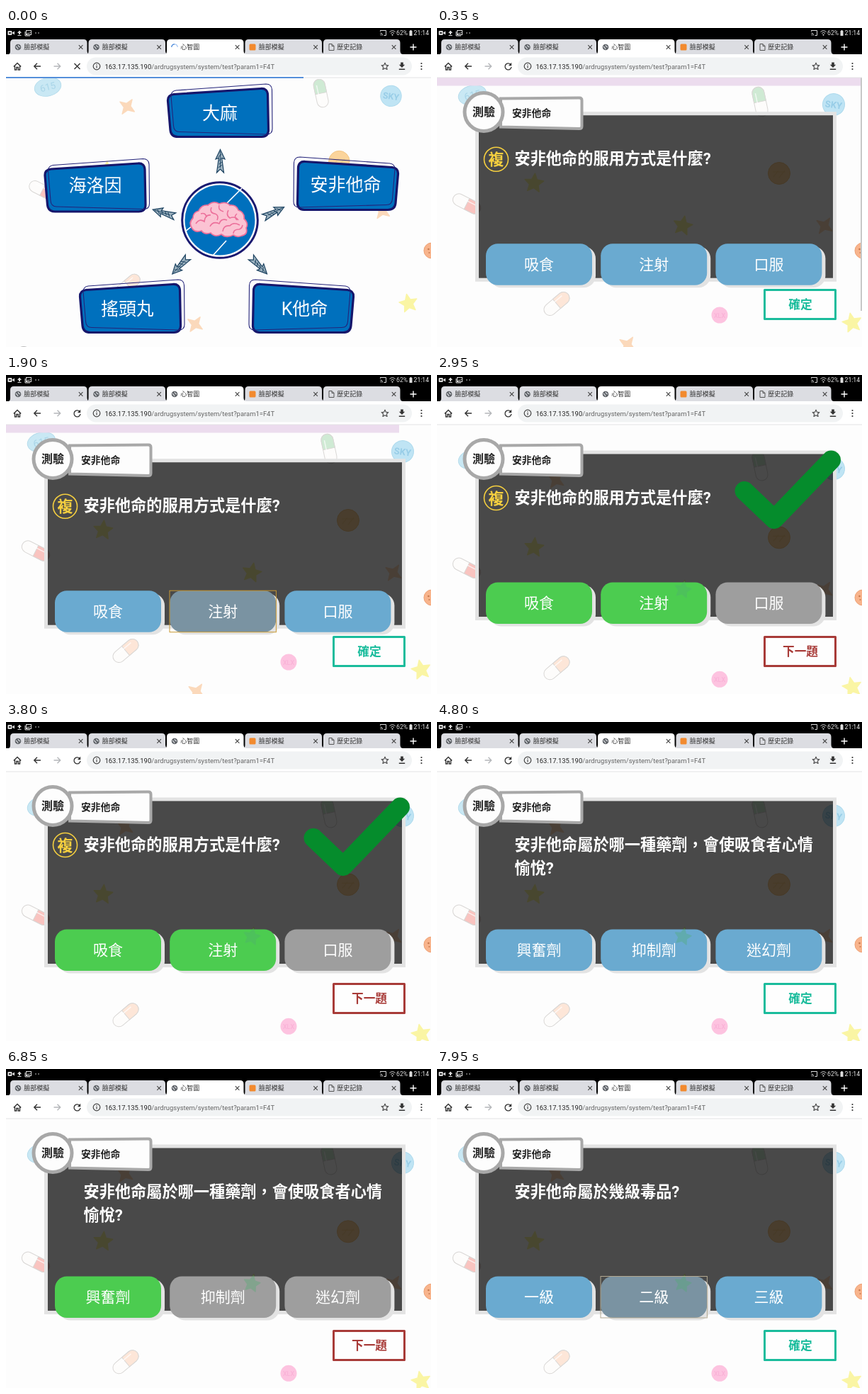
Recreate the animation shown at these times as an HTML page. Size 600x450 px, loop 8 s.

```html
<!DOCTYPE html>
<html lang="zh-Hant">
<head>
<meta charset="utf-8">
<title>心智圖</title>
<style>
html, body { margin: 0; width: 100%; height: 100%; overflow: hidden; background: #fdfdfd; }
svg { display: block; width: 100vw; height: 100vh; font-family: Roboto, "Noto Sans CJK TC", sans-serif; }
.mid { text-anchor: middle; }
.bold { font-weight: 700; }
.line { fill: none; stroke: #333; stroke-width: 1.4; }
</style>
</head>
<body>
<svg id="stage" viewBox="0 0 600 450"></svg>
<script>
const LOOP = 8000;

const questions = [
  { lines: ['安非他命的服用方式是什麼?'], options: ['吸食', '注射', '口服'], multiple: true },
  { lines: ['安非他命屬於哪一種藥劑，會使吸食者心情', '愉悅?'], options: ['興奮劑', '抑制劑', '迷幻劑'] },
  { lines: ['安非他命屬於幾級毒品?'], options: ['一級', '二級', '三級'] }
];

const steps = [
  { at: 0, map: true },
  { at: 250, q: 0, timed: true },
  { at: 1800, q: 0, timed: true, picked: [1], focus: 1, ring: '#c99a35' },
  { at: 2250, q: 0, timed: true, picked: [0, 1], focus: 0, ring: '#c99a35' },
  { at: 2700, q: 0, right: [0, 1], tick: true },
  { at: 3900, q: 1 },
  { at: 5850, q: 1, picked: [1], focus: 1, ring: '#b3a991' },
  { at: 6550, q: 1, right: [0] },
  { at: 7100, q: 2 },
  { at: 7700, q: 2, picked: [1], focus: 1, ring: '#b3a991' }
];

const rect = (x, y, w, h, fill, extra = '') =>
  `<rect x="${x}" y="${y}" width="${w}" height="${h}" fill="${fill}" ${extra}/>`;
const circle = (x, y, r, fill, extra = '') => `<circle cx="${x}" cy="${y}" r="${r}" fill="${fill}" ${extra}/>`;
const path = (d, extra = 'class="line"') => `<path d="${d}" ${extra}/>`;
const text = (x, y, size, fill, str, cls = '') =>
  `<text x="${x}" y="${y}" font-size="${size}" fill="${fill}" class="${cls}">${str}</text>`;
const group = (transform, body) => `<g transform="${transform}">${body}</g>`;

function star(x, y, points, outer, inner, fill, turn = 0, extra = '') {
  const pts = Array.from({ length: points * 2 }, (_, i) => {
    const r = i % 2 ? inner : outer, a = i * Math.PI / points - Math.PI / 2 + turn;
    return `${(x + r * Math.cos(a)).toFixed(1)},${(y + r * Math.sin(a)).toFixed(1)}`;
  });
  return `<polygon points="${pts.join(' ')}" fill="${fill}" stroke="${fill}" stroke-width="1.5" stroke-linejoin="round" ${extra}/>`;
}

const capsule = (x, y, turn, color) => group(`translate(${x} ${y}) rotate(${turn})`,
  rect(-8.5, -21, 17, 42, '#fdfcfb', 'rx="8.5" stroke="#d9d7d5"') +
  path('M-8.5,0V-12.5a8.5,8.5 0 0 1 17,0V0z', `fill="${color}" stroke="#d9d7d5"`) +
  path('M-4,-13V14', 'stroke="#fff" stroke-width="1.5" opacity=".7"'));

function backdrop() {
  const peach = '#fbd9bb', yellow = '#faf5a4';
  return group('translate(50 94.5) rotate(-14)',
      '<ellipse rx="20" ry="13.5" fill="#c9e8f4" stroke="#b5dcec"/>' +
      text(0, 5, 14, '#a9d5e8', '615', 'mid')) +
    group('translate(560 108) rotate(8)', circle(0, 0, 15.5, '#bfe4f4', 'stroke="#aedaed"') +
      text(0, 5, 13, '#98cde7', 'SKY', 'mid bold')) +
    capsule(456, 104, -12, '#cfead4') + capsule(42, 248, 117, '#f9c4c0') + capsule(169, 389, 50, '#fde6d8') +
    circle(483, 205, 15.5, '#fbd49b', 'stroke="#f3c583"') +
    path('M475,210l7,-9M483,211l8,-10M474,203h18', 'fill="none" stroke="#f5c888" stroke-width="1.2"') +
    circle(399, 405, 11.5, '#fdc3e0') + text(399, 409, 9, '#f8aed5', 'XLX', 'mid') +
    star(168, 124, 4, 13, 5, peach, .6) + star(547, 279, 4, 13, 5, peach, .6) + star(269, 447, 4, 13, 5, peach, .6) +
    star(137, 219, 5, 14, 6.5, yellow, .1) + star(347, 279, 5, 14, 6.5, yellow, .2) +
    star(586, 416, 5, 14, 6.5, yellow, -.2);
}

const globe = (x, y) => circle(x, y, 4.3, '#5f6368') +
  path(`M${x - 3},${y - 1}l2,2 1,2M${x},${y - 3}l1,2 2,1`, 'fill="none" stroke="#dfe1e5" stroke-width="1.1"');

function tabs() {
  const names = ['臉部模擬', '臉部模擬', '心智圖', '臉部模擬', '歷史記錄'];
  const shape = (x, fill) => path(`M${x},37.5q4,0 4,-5V21q0,-5 5,-5h98.5q5,0 5,5v11q0,5 4,5z`, `fill="${fill}"`);
  const order = [0, 1, 3, 4, 2];
  const marks = [globe(17, 27), globe(127.5, 27), '', rect(343.5, 22.5, 9, 9, '#f28a2e', 'rx="1.5"'),
    path('M456,22.5h4l3,3v6h-7zM460,22.5v3h3', 'fill="none" stroke="#555"')];
  return order.map(i => {
    const x = 2 + i * 110.5;
    return shape(x, i === 2 ? '#fff' : '#dcdde2') + marks[i] + text(x + 23.3, 30, 9, '#333', names[i]) +
      path(`M${x + 100.8},24.2l5.6,5.6m0,-5.6l-5.6,5.6`, 'stroke="#444" stroke-width="1.1"');
  }).join('') + path('M575,22.5v9M570.5,27h9', 'stroke="#fff" stroke-width="1.4"');
}

function statusBar() {
  const white = 'fill="#ddd"', thin = 'fill="none" stroke="#ddd"';
  return rect(0, 0, 600, 38, '#000') +
    rect(2.5, 4, 6, 6, '#ddd', 'rx="1"') + path('M9,6.5l3,-2v5l-3,-2z', white) + circle(5.5, 7, 1.2, '#000') +
    path('M19,3.5l3,3.5h-2v2h-2v-2h-2zM16.5,10h5v1h-5z', white) +
    rect(28.5, 3.5, 7, 6, 'none', 'stroke="#ddd"') + path('M27,5v6h7M29,9l2,-2 1.5,1 2,-2', thin) +
    circle(42, 7, .8, '#ddd') + circle(46, 7, .8, '#ddd') +
    path('M528.5,5V3.5h8v7h-3M528.5,7q3,0 3,3.5M528.5,9q1,0 1,1.5', thin) +
    path('M541.5,5.5q4,-3.5 8,0M543.2,7.5q2.4,-2 4.8,0', thin) + path('M545.5,11l-1.5,-2h3z', white) +
    text(551, 10.3, 8.7, '#ddd', '62%') + rect(569.5, 4, 4, 7, '#ddd', 'rx=".6"') + rect(570.5, 3, 2, 1, '#ddd') +
    text(575.5, 10.3, 8.7, '#eee', '21:14');
}

function toolbar() {
  return rect(0, 37, 600, 33, '#fff') + rect(114, 41.5, 459, 25, '#f1f3f4', 'rx="12.5"') +
    path('M10.8,54.5L16,49.5l5.2,5M12.5,53.5v5.5h2.3v-3.5h2.4v3.5h2.3v-5.5') +
    path('M49,54h-9m4,-4.2l-4.2,4.2 4.2,4.2') +
    path('M67.5,54h9m-4,-4.2l4.2,4.2 -4.2,4.2', 'class="line" style="stroke:#b5b7ba"') +
    circle(128, 54, 4.8, 'none', 'stroke="#444" stroke-width="1.2"') +
    path('M128,53.2v3.4M128,51v1.2', 'stroke="#444" stroke-width="1.2"') +
    `<text x="139.5" y="57.5" font-size="9.43" fill="#222">163.17.135.190<tspan fill="#666">/ardrugsystem/system/test?param1=F4T</tspan></text>` +
    star(535, 54.3, 5, 5.2, 2.4, '#444', 0, 'style="fill:none;stroke-width:1.1"') +
    path('M557.2,48.5h3.6v3.2h2.4l-4.2,4.2 -4.2,-4.2h2.4zM554.8,57.6h8.4v1.5h-8.4z', 'fill="#333"') +
    [50, 54, 58].map(y => circle(586.5, y, 1.1, '#333')).join('') +
    rect(0, 69.5, 600, 1, '#e4e4e6');
}

function mindMap() {
  const box = (x, y, flip, label, tx, ty) =>
    group(`translate(${x} ${y}) scale(${flip} 1)`,
      path('M9,7.5L132,-.5Q141,-1 141.5,8L142.5,58Q142.5,67 133,67.5H15Q5,67.5 4,58L.5,17Q0,8.5 9,7.5z',
        'fill="#0070bd" stroke="#16166b" stroke-width="3.2"') +
      path('M12,2L139,-7Q147,-7 147.5,1L148,56Q148,64 140,64L17,60.5Q9,60.5 8.5,52L5,10Q5,3 12,2z',
        'fill="none" stroke="#24247a" stroke-width="1.1"')) +
    text(tx, ty + 9.4, 25, '#fff', label, 'mid');
  const arrow = (x, y, turn) => group(`translate(${x} ${y}) rotate(${turn})`,
    path('M0,-16.5L6.5,-3 2.2,-4.5 5,16 0,11 -5,16 -2.2,-4.5 -6.5,-3z', 'fill="#9db2bf" stroke="#1d4361" stroke-width="1.2"') +
    path('M-3,-6l5,-4M-2,-1l4,-3M-2,4l5,-3M-3,9l6,-4M0,-14V9', 'stroke="#1d4361" stroke-width=".9"'));
  const brain = path('M263,283q-6,-8 1,-15q0,-8 8,-10q4,-9 13,-8q8,-7 16,-2q9,-4 15,2q9,-1 12,7q9,3 8,12q7,7 3,13q3,9 -6,11q-7,3 -12,-1q-10,5 -17,-1q-9,5 -15,-2q-9,3 -13,-3q-9,3 -13,-3z',
      'fill="#fbc3d3" stroke="#ec709b" stroke-width="1.8"') +
    path('M268,276q5,-8 12,-3q1,-10 9,-9M275,262q7,-2 8,5M290,253q-3,8 5,9q6,2 3,9M301,250q-2,7 6,9M288,280q4,-8 13,-4q3,-8 11,-5M314,257q-4,7 2,11q8,-3 12,3M326,262q-5,4 0,9M306,287q1,-9 10,-8q5,-6 14,-1M321,290q0,-6 8,-6q4,-1 5,-6',
      'fill="none" stroke="#ec709b" stroke-width="1.6"');
  return box(228, 86, 1, '大麻', 302, 120) + box(54.5, 191.5, 1, '海洛因', 126, 221.5) +
    box(554, 189, -1, '安非他命', 479.5, 220.5) + box(104, 362, 1, '搖頭丸', 171.5, 396) +
    box(491, 362, -1, 'K他命', 421.5, 395.5) +
    arrow(302.5, 188, 0) + arrow(223, 261, -73) + arrow(378, 260, 63) + arrow(246, 335, -137) + arrow(357, 335, 136) +
    circle(302, 271, 53.3, '#fff', 'stroke="#191970" stroke-width="3"') + circle(302, 271, 49.5, '#0070bd') +
    path('M300,259L333,226M292,321l19,-21M253,287l20,-16', 'stroke="#fff" stroke-width="1.6"') + brain +
    circle(25, 460, 11, '#b9b9b9') + rect(0, 69, 420, 1.6, '#3f82d8');
}

function quiz(step) {
  const { lines, options, multiple } = questions[step.q];
  const { picked = [], right } = step;
  const accent = right ? '#a83b38' : '#1abc9c';
  const optionFill = i => right ? (right.includes(i) ? '#4ccc50' : '#9e9e9e') : picked.includes(i) ? '#7a93a2' : '#6aaad0';
  const board = rect(56.5, 109, 505, 234.5, '#000', 'fill-opacity=".71"') +
    rect(56.5, 109, 505, 234.5, 'none', 'stroke="#e3e3e3" stroke-width="5"') +
    (multiple ? circle(83.5, 173.5, 17, 'none', 'stroke="#f5cf3f" stroke-width="1.6"') +
      text(83.5, 181.5, 22, '#f5cf3f', '複', 'mid bold') : '') +
    lines.map((line, i) => text(109.5, 180.8 + i * 33.5, 22.2, '#fff', line, 'bold')).join('') +
    options.map((label, i) => {
      const x = 69 + i * 162.2;
      return rect(x + 5, 296.5, 150, 58, '#e3e3e3', 'rx="17"') +
        rect(x, 292.5, 150, 58.5, optionFill(i), 'rx="17"') +
        (i === 1 && !step.timed ? star(347, 303, 5, 12, 6, '#4fae70', .2, 'opacity=".35"') : '') +
        text(x + 75, 329, 21, '#fff', label, 'mid') +
        (step.focus === i ? rect(x - .2, 292.5, 150.4, 58.5, 'none', `stroke="${step.ring}"`) : '');
    }).join('');
  return group(`translate(0 ${step.timed ? 11.7 : 0})`, board) +
    path('M90,99.5L201,98.5Q204.5,98.5 204.5,102V138.5Q204.5,142 201,142L90,139.5z',
      'fill="#fdfdfd" stroke="#a8a8a8" stroke-width="4"') +
    circle(66, 118.5, 27, '#fdfdfd', 'stroke="#a8a8a8" stroke-width="5"') +
    text(66, 123.5, 16, '#222', '測驗', 'mid bold') + text(106, 125, 13.8, '#222', '安非他命', 'bold') +
    rect(462.5, 369.5, 100, 41, '#fefefe', `stroke="${accent}" stroke-width="3" stroke-linejoin="round"`) +
    text(513, 396, 16.7, accent, right ? '下一題' : '確定', 'mid bold') +
    (step.tick ? path('M434,163.5L476,203.5L556.5,120',
      'fill="none" stroke="#058c2c" stroke-width="27" stroke-linecap="round" stroke-linejoin="round"') : '');
}

const stage = document.getElementById('stage');
stage.innerHTML = rect(0, 0, 600, 450, '#fdfdfd') + `<g id="backdrop">${backdrop()}</g><g id="page"></g>` +
  rect(0, 70, 600, 11.5, '#ecdcee', 'id="timer"') +
  circle(601, 314, 11, '#f8b48c', 'stroke="#eda277"') + circle(596.5, 312, 1.3, '#c77a50') + circle(597.5, 317, 1, '#c77a50') +
  rect(598, 70, 2, 329, '#c9c9c9', 'id="scroll"') +
  statusBar() + tabs() + toolbar() + '<g id="loadState"></g>';

const el = id => document.getElementById(id);
const busy = path('M238,22.8a4.2,4.2 0 0 0 -4.2,4.2', 'fill="none" stroke="#3f82d8" stroke-width="1.3"') +
  path('M238,22.8a4.2,4.2 0 0 1 4.2,4.2', 'fill="none" stroke="#a9c7ef" stroke-width="1.3"') +
  path('M96.5,50l8,8m0,-8l-8,8') + rect(0, 69, 420, 1.6, '#3f82d8');
const idle = globe(238, 27) +
  path('M104,51.5a4.5,4.5 0 1 0 1,3.5') + path('M105.2,48.8v4.4h-4.4z', 'fill="#333"');

let shown = null;

function show(step) {
  el('page').innerHTML = step.map ? mindMap() : quiz(step);
  el('loadState').innerHTML = step.map ? busy : idle;
  el('backdrop').setAttribute('transform',
    step.map ? 'matrix(.95 0 0 .95 11.5 -6.7)' : `translate(0 ${step.timed ? 0 : 24.3})`);
  el('timer').style.display = el('scroll').style.display = step.timed ? '' : 'none';
  shown = step;
}

function draw(now) {
  const t = now % LOOP;
  const step = steps.filter(s => s.at <= t).pop();
  if (step !== shown) show(step);
  // the countdown empties in twenty seconds; the scrollbar fades soon after loading
  el('timer').setAttribute('width', Math.min(600, 600 - (t - 400) * .03));
  el('scroll').setAttribute('opacity', Math.max(0, Math.min(1, (1000 - t) / 250)));
  requestAnimationFrame(() => draw(performance.now() - start));
}

const start = performance.now();
draw(0);
</script>
</body>
</html>
```
